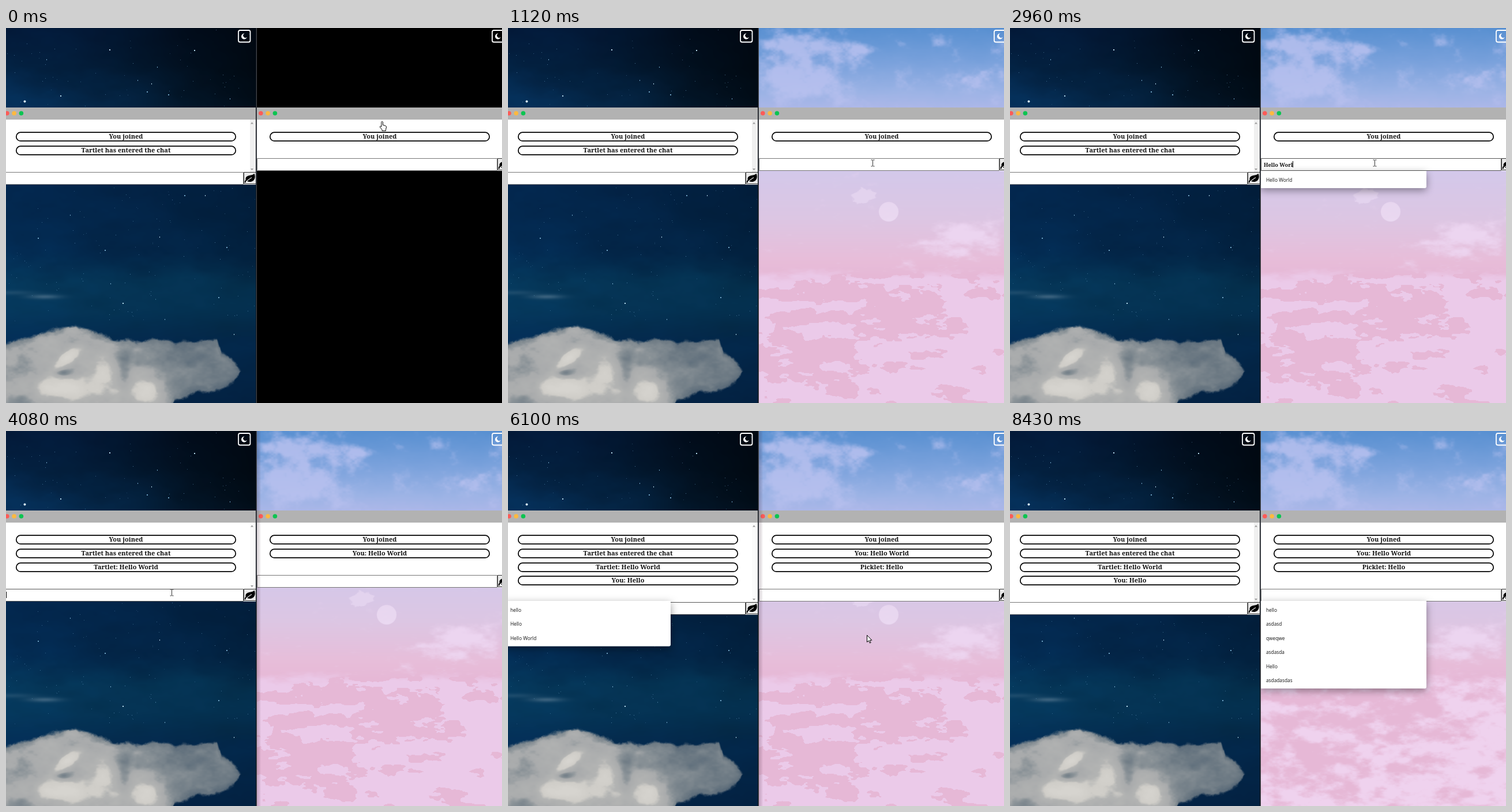
These frames come from a looping animation (860x651 px, 8530 ms). An HTML page with a canvas:

```html
<!DOCTYPE html>
<html lang="en">
<head>
<meta charset="utf-8">
<title>Two chat windows</title>
<style>
html, body { margin: 0; width: 100%; height: 100%; overflow: hidden; background: #000; }
canvas { display: block; }
</style>
</head>
<body>
<canvas id="stage" width="860" height="651"></canvas>
<script>
const W = 860, H = 651, LOOP = 8530;
const ctx = document.getElementById('stage').getContext('2d');
const SERIF = '"Noto Serif", "Liberation Serif", serif';
const SANS = '"Open Sans", "Noto Sans", sans-serif';
const LEFT_NAME = 'Picklet', RIGHT_NAME = 'Tartlet';

// ---------- helpers ----------
let seed = 7;
const rnd = () => (seed = (seed * 1664525 + 1013904223) >>> 0) / 4294967296;
const lattice = Array.from({ length: 4096 }, rnd);
const clamp = v => v < 0 ? 0 : v > 1 ? 1 : v;
const smooth = (a, b, v) => { v = clamp((v - a) / (b - a)); return v * v * (3 - 2 * v); };
const rgb = h => [h >> 16 & 255, h >> 8 & 255, h & 255];
const mix = (a, b, k) => [a[0] + (b[0] - a[0]) * k, a[1] + (b[1] - a[1]) * k, a[2] + (b[2] - a[2]) * k];
const blob = (x, y, cx, cy, rx, ry) => Math.exp(-(((x - cx) / rx) ** 2) - ((y - cy) / ry) ** 2);
const cell = (x, y) => lattice[(x & 63) + ((y & 63) << 6)];

function noise(x, y) {
  const i = Math.floor(x), j = Math.floor(y);
  let u = x - i, v = y - j;
  u *= u * (3 - 2 * u);
  v *= v * (3 - 2 * v);
  const a = cell(i, j), b = cell(i, j + 1);
  return (a + (cell(i + 1, j) - a) * u) * (1 - v) + (b + (cell(i + 1, j + 1) - b) * u) * v;
}
function fbm(x, y) {
  return noise(x, y) * .5 + noise(x * 2.1 + 9, y * 2.1 + 5) * .27 +
    noise(x * 4.3 + 3, y * 4.3 + 17) * .15 + noise(x * 8.7, y * 8.7 + 31) * .08;
}
function line(points, x) {
  let i = 1;
  while (i < points.length - 1 && x > points[i][0]) i++;
  const [x0, y0] = points[i - 1], [x1, y1] = points[i];
  return y0 + (y1 - y0) * clamp((x - x0) / (x1 - x0));
}
const stops = list => list.map(([p, c]) => [p, rgb(c)]);
function ramp(list, p) {
  let i = 1;
  while (i < list.length - 1 && p > list[i][0]) i++;
  const a = list[i - 1], b = list[i];
  return mix(a[1], b[1], clamp((p - a[0]) / (b[0] - a[0])));
}
function paint(w, pixel) {
  const c = document.createElement('canvas');
  c.width = w;
  c.height = H;
  const g = c.getContext('2d'), img = g.createImageData(w, H);
  for (let y = 0, k = 0; y < H; y++) {
    for (let x = 0; x < w; x++, k += 4) {
      const p = pixel(x, y);
      img.data[k] = p[0];
      img.data[k + 1] = p[1];
      img.data[k + 2] = p[2];
      img.data[k + 3] = 255;
    }
  }
  g.putImageData(img, 0, 0);
  return c;
}

// ---------- night sky ----------
const nightSky = stops([[0, 0x031a3a], [70, 0x03203f], [125, 0x052e56], [280, 0x032850],
  [390, 0x032c54], [440, 0x05395d], [490, 0x05385c], [540, 0x042f58], [651, 0x03284f]]);
const greys = stops([[0, 0x465a6d], [.28, 0x6c7983], [.46, 0x8a9297], [.56, 0xa9abac],
  [.74, 0xb3b4b3], [.82, 0xcfcdc8], [1, 0xd6d4cf]]);
const cloudTop = [[0, 547], [40, 536], [80, 525], [115, 518], [160, 528], [185, 540], [235, 546],
  [262, 538], [290, 546], [330, 545], [365, 541], [373, 562], [390, 575], [407, 595]];
const cloudBase = [[0, 720], [272, 690], [292, 648], [330, 632], [370, 629], [395, 613], [407, 596]];

function nightPixel(x, y) {
  const n = fbm(x / 80, y / 40);
  const dark = (x / 434) * (y < 200 ? .72 * smooth(-30, 330, x) : .3 - smooth(330, 460, y) * .12);
  const lift = .9 + n * .2;
  let c = ramp(nightSky, y + (n - .5) * 30).map(v => v * (1 - dark) * lift);
  const streak = blob(x, y, 66, 466, 28, 4) * .35 + blob(x, y, 10, 459, 40, 4) * .15;
  c = mix(c, [150, 170, 185], streak);
  if (y < 500) return c;
  const rough = (fbm(x / 14, y / 12) - .5) * 12 + 4;
  const inside = x > 407 ? 0 : Math.min(y - line(cloudTop, x), line(cloudBase, x) - y) + rough;
  if (inside <= 0) return c;
  const tone = .6 - smooth(190, 330, x) * .28 + (fbm(x / 38 + 4, y / 26) - .5) * .36
    + blob(x - (590 - y) * .9, y, 90, 575, 15, 28) * .3 + blob(x, y, 110, 625, 68, 20) * .34
    + blob(x, y, 168, 594, 20, 26) * .25 + blob(x, y, 243, 630, 28, 22) * .5
    - blob(x, y, 204, 590, 12, 40) * .22 - blob(x, y, 97, 598, 14, 7) * .28
    - blob(x, y, 25, 585, 30, 18) * .12 - blob(x, y, 20, 648, 24, 14) * .2 - .18 * (1 - smooth(0, 20, inside));
  return mix(c, ramp(greys, tone), smooth(0, 7, inside));
}

const brightStars = [[252, 96], [244, 110], [228, 90], [179, 37], [111, 324], [171, 385], [266, 362],
  [382, 380], [181, 443], [202, 477], [275, 505], [368, 467], [395, 531], [55, 364], [70, 54],
  [326, 38], [388, 122], [309, 290], [345, 290], [281, 115], [262, 67], [94, 117]];

const night = paint(434, nightPixel);
{
  const g = night.getContext('2d');
  for (let i = 0; i < 230; i++) {
    g.fillStyle = `rgba(110,165,205,${.2 + rnd() * .45})`;
    g.fillRect(Math.floor(rnd() * 434), Math.floor(rnd() * 510), 1, 1);
  }
  brightStars.forEach(([x, y], i) => {
    g.fillStyle = i % 3 ? '#6fa3c4' : '#b5dcec';
    g.fillRect(x, y, i % 2 + 1, 2);
  });
  g.fillStyle = '#d8f3ff';
  g.beginPath();
  g.arc(32.5, 127.5, 2, 0, 7);
  g.fill();
}

// ---------- day sky: 0 flat, 1 mixed, 2 soft ----------
const daySky = stops([[0, 0x5990d1], [60, 0x7ba2dc], [110, 0x9cb3e5], [138, 0xacb7e8],
  [248, 0xd3c8ea], [330, 0xdcc6e3], [400, 0xe7bdd9], [430, 0xe6b8d6]]);
const PALE = rgb(0xebcae9), ROSE = rgb(0xe6b8d6), MIST = rgb(0xeed8f3), LILAC = rgb(0xb9c1ef);

function dayPixel(mode, px, y) {
  const x = px + 435;
  if (y < 140) {
    const n = fbm(x / 34 + 20, y / 26 + 8);
    const mask = blob(x, y, 500, 82, 95, 52) * .42 + blob(x, y, 520, 28, 75, 18) * .28
      + blob(x, y, 615, 34, 35, 12) * .3 + blob(x, y, 750, 94, 75, 14) * .22;
    return mix(ramp(daySky, y + (n - .5) * 16), LILAC, smooth(.45, .85, n * .8 + mask) * .85);
  }
  if (y < 220) return ramp(daySky, y);
  const n = fbm(x / 48, y / 21);
  let c = ramp(daySky, y);
  if (mode === 0) {
    const edge = y + (n - .5) * 44;
    c = edge < 348 ? rgb(0xd5c6e6) : edge < 396 ? PALE : ROSE;
  }
  const wisp = blob(x + (y - 370) * .8, y, 780, 370, 72, 46);
  const w = wisp * .48 + fbm(x / 30 + 7, y / 15) * .75;
  c = mix(c, mode ? MIST : PALE, mode ? smooth(.5, .92, w) * .85 : +(w > .62));
  const low = smooth(418, 440, y + (n - .5) * 36);
  if (low > 0) {
    const bias = .04 + smooth(540, 620, y) * .05 + smooth(780, 850, x) * .06
      - blob(x, y, 700, 455, 100, 28) * .22 - blob(x, y, 555, 562, 60, 24) * .24
      - blob(x, y, 755, 515, 65, 34) * .16 - blob(x, y, 600, 500, 160, 14) * .14
      + blob(x, y, 470, 445, 45, 18) * .16 + blob(x, y, 660, 580, 70, 40) * .08;
    const v = n + bias;
    const k = mode === 2 ? smooth(.3, .72, v + (fbm(x / 22, y / 14) - .5) * .6) : +(v > .49);
    c = mix(c, mix(ROSE, mode === 2 ? rgb(0xefd2ee) : PALE, k), low);
  }
  const puff = blob(x, y, 615, 291, 24, 15) * .8 + (fbm(x / 14, y / 10) - .5) * .7;
  c = mix(c, mode ? rgb(0xe6d6f0) : PALE, smooth(.36, .5, puff) * .8);
  const d = Math.hypot(x - 659.5, y - 318.5);
  const moon = mode || d + x - 659 > 2 ? rgb(0xebdaf2) : PALE;
  return mix(c, moon, smooth(18, 16, d) * (.7 + n * .3));
}
const day = [0, 1, 2].map(mode => paint(425, (x, y) => dayPixel(mode, x, y)));

// ---------- timeline ----------
const at = (list, t) => {
  let hit = list[0];
  for (const item of list) if (item[0] <= t) hit = item;
  return hit;
};
const within = (t, ...spans) => spans.some(([a, b]) => t >= a && t < b);

const pointer = [
  [0, 653, 170, 'hand'], [130, 650, 182, 'hand'], [270, 643, 206, 'arrow'], [410, 634, 230, 'beam'],
  [550, 631, 241, 'beam'], [840, 631, 239, 'beam'], [980, 632, 236, 'beam'], [1120, 632, 234, 'beam'],
  [3510, 600, 238, 'beam'], [3650, 510, 250, 'arrow'], [3790, 395, 266, 'beam'], [3940, 312, 277, 'beam'],
  [4080, 287, 280, 'beam'], [5950, 455, 322, 'arrow'], [6100, 622, 354, 'arrow'], [6240, 634, 334, 'arrow'],
  [6390, 641, 312, 'arrow'], [6530, 644, 291, 'beam'], [6680, 645, 286, 'beam'], [6960, 645, 284, 'beam'],
  [7390, 648, 350, 'arrow'], [7530, 652, 460, 'arrow'], [7680, 656, 580, 'arrow'], [7820, 0, 0, 'none']];

const rightTyping = [[0, ''], [1810, 'H'], [1940, 'He'], [2090, 'Hel'], [2240, 'Hello'], [2390, 'Hello '],
  [2660, 'Hello W'], [2810, 'Hello Wo'], [2960, 'Hello Worl'], [3080, 'Hello World'], [3210, '']];
const leftTyping = [[0, ''], [5090, 'H'], [5220, 'He'], [5350, 'Hell'], [5500, 'Hello'], [5650, '']];
const history = ['hello', 'asdasd', 'qweqwe', 'asdasda', 'Hello', 'asdadasdas', 'hi', 'Hello World'];
const matches = q => history.filter(s => s.toLowerCase().startsWith(q.toLowerCase())).slice(0, 6);

function leftState(t) {
  const lines = ['You joined', RIGHT_NAME + ' has entered the chat'];
  if (t >= 3210) lines.push(RIGHT_NAME + ': Hello World');
  if (t >= 5650) lines.push('You: Hello');
  const text = at(leftTyping, t)[1];
  return {
    lines, text,
    focus: within(t, [4080, 6390]),
    caret: within(t, [4080, 4640], [4940, 5650]),
    menu: within(t, [4940, 6390]) && matches(t >= 5650 ? 'Hello' : text),
    menuTop: 295,
    bar: within(t, [3210, 6390]) ? '#fbfbfb' : '#f0f0f0'
  };
}
function rightState(t) {
  const lines = ['You joined'];
  if (t >= 3210) lines.push('You: Hello World');
  if (t >= 5650) lines.push(LEFT_NAME + ': Hello');
  const text = at(rightTyping, t)[1];
  return {
    lines, text,
    focus: within(t, [1240, 4080]),
    caret: within(t, [1240, 3510]),
    menu: within(t, [1680, 3210], [7240, LOOP]) && matches(text),
    menuTop: t < 4000 ? 248 : 295,
    bar: '#f0f0f0'
  };
}

// ---------- interface ----------
function rect(x, y, w, h, fill) {
  ctx.fillStyle = fill;
  ctx.fillRect(x, y, w, h);
}
function label(s, x, y, font, align = 'left') {
  ctx.font = font;
  ctx.textAlign = align;
  ctx.fillStyle = '#111';
  ctx.fillText(s, x, y);
}
function outline(x, y, w, h, r, color, width) {
  ctx.beginPath();
  ctx.roundRect(x, y, w, h, r);
  ctx.strokeStyle = color;
  ctx.lineWidth = width;
  ctx.stroke();
}
function triangle(x, y, dir) {
  ctx.fillStyle = '#999';
  ctx.beginPath();
  ctx.moveTo(x - 2.5, y);
  ctx.lineTo(x + 2.5, y);
  ctx.lineTo(x, y + dir * 3);
  ctx.fill();
}
function moonButton() {
  outline(403, 4, 20.5, 20.5, 3, '#fff', 1.8);
  ctx.fillStyle = '#fff';
  ctx.beginPath();
  ctx.arc(413, 14.5, 5, -1.4, .65, true);
  ctx.arc(415.2, 13, 3.9, .9, 4.4);
  ctx.fill();
}
function leafButton(y) {
  rect(412, y, 22, 21, '#e9e9e9');
  outline(412.5, y + .5, 22, 20, 0, '#333', 1);
  ctx.fillStyle = '#000';
  ctx.beginPath();
  ctx.moveTo(430.5, y + 2.5);
  ctx.bezierCurveTo(434, y + 10, 430, y + 17.5, 422, y + 17);
  ctx.bezierCurveTo(418, y + 16.5, 415, y + 15, 415.5, y + 11.5);
  ctx.bezierCurveTo(416.5, y + 4, 427, y + 7.5, 430.5, y + 2.5);
  ctx.fill();
  for (const [color, width, end] of [['#e9e9e9', 1.1, 426], ['#000', 2, 416.5]]) {
    ctx.strokeStyle = color;
    ctx.lineWidth = width;
    ctx.beginPath();
    ctx.moveTo(414.5, y + 18.5);
    ctx.quadraticCurveTo((414.5 + end) / 2, y + 13, end, end > 420 ? y + 9.5 : y + 15.5);
    ctx.stroke();
  }
}
function suggestions(items, top) {
  const h = 5.6 + 24.4 * items.length;
  ctx.save();
  ctx.shadowColor = 'rgba(0,0,0,.4)';
  ctx.shadowBlur = 14;
  ctx.shadowOffsetY = 4;
  ctx.fillStyle = '#fff';
  ctx.beginPath();
  ctx.roundRect(-6, top, 288, h, [0, 0, 3, 3]);
  ctx.fill();
  ctx.restore();
  items.forEach((s, i) => label(s, 4, Math.round(top + 19 + i * 24.4), '8.3px ' + SANS));
}
function panel(shift, x, w, s) {
  const inputY = Math.round(202.2 + 23.8 * s.lines.length);
  ctx.save();
  ctx.beginPath();
  ctx.rect(x, 0, w, H);
  ctx.clip();
  ctx.translate(shift, 0);
  moonButton();
  rect(-6, 138, 440, 21, '#b2b2b2');
  ['#fc5b57', '#fdb93f', '#0cc451'].forEach((color, i) => {
    ctx.fillStyle = color;
    ctx.beginPath();
    ctx.arc(1.8 + i * 12.3, 148, 3.8, 0, 7);
    ctx.fill();
  });
  rect(-6, 159, 440, inputY - 159, '#fff');
  rect(423, 159, 11, inputY - 159, s.bar);
  triangle(426.5, 166.5, -1);
  triangle(426.5, inputY - 6, 1);
  s.lines.forEach((text, i) => {
    const y = Math.round(181 + i * 23.8);
    outline(17.8, y + .2, 380.4, 15, 7.5, '#000', 1.7);
    label(text, 208, y + 11, '600 11px ' + SERIF, 'center');
  });
  rect(-6, inputY, 440, 22, '#fff');
  outline(-4.5, inputY + .5, 416, 21, 0, s.focus ? '#555' : '#767676', 1);
  const font = '600 9.2px ' + SERIF;
  label(s.text, 0, inputY + 15, font);
  if (s.caret) {
    ctx.font = font;
    rect(Math.round(ctx.measureText(s.text).width), inputY + 5, 1, 11, '#000');
  }
  leafButton(inputY);
  if (s.menu) suggestions(s.menu, s.menuTop);
  ctx.restore();
}

// ---------- pointer ----------
const shapes = {
  arrow: new Path2D('M0 0V12L2.8 9.4L4.8 13.6L6.6 12.8L4.7 8.7H8.4Z'),
  hand: new Path2D('M-2 -8C-.6 -8.6 0 -7.6 0 -6.5V-2L4 -1Q6 -.5 6 1.5L5 6V8H-1.5V6L-5.5 1Q-5 -1 -2.6 .8V-7Q-2.6 -7.8 -2 -8Z'),
  beam: new Path2D('M-3 -5.5H-1L0 -4.8L1 -5.5H3M0 -4.8V4.8M-3 5.5H-1L0 4.8L1 5.5H3')
};
function drawPointer([, x, y, kind]) {
  if (!shapes[kind]) return;
  ctx.save();
  ctx.translate(x + .5, y + .5);
  ctx.lineWidth = 1;
  ctx.strokeStyle = kind === 'beam' ? '#333' : '#000';
  ctx.fillStyle = '#fff';
  if (kind !== 'beam') ctx.fill(shapes[kind]);
  ctx.stroke(shapes[kind]);
  ctx.restore();
}

function draw(t) {
  rect(0, 0, W, H, '#000');
  ctx.drawImage(night, 0, 0);
  if (t >= 130) ctx.drawImage(day[t < 1120 ? 0 : t < 7240 ? 1 : 2], 435, 0);
  panel(440, 435, 425, rightState(t));
  if (within(t, [4080, 6820], [8270, 8430])) {
    const g = ctx.createLinearGradient(435, 0, 442, 0);
    g.addColorStop(0, 'rgba(60,30,50,.22)');
    g.addColorStop(.8, 'rgba(60,30,50,.07)');
    g.addColorStop(1, 'rgba(60,30,50,0)');
    rect(435, 0, 7, H, g);
  }
  panel(0, 0, 433, leftState(t));
  rect(433, 0, 1, H, '#14181f');
  rect(434, 0, 1, H, '#464a50');
  drawPointer(at(pointer, t));
}

const start = performance.now();
function tick() {
  draw((performance.now() - start) % LOOP);
  requestAnimationFrame(tick);
}
tick();
</script>
</body>
</html>
```
